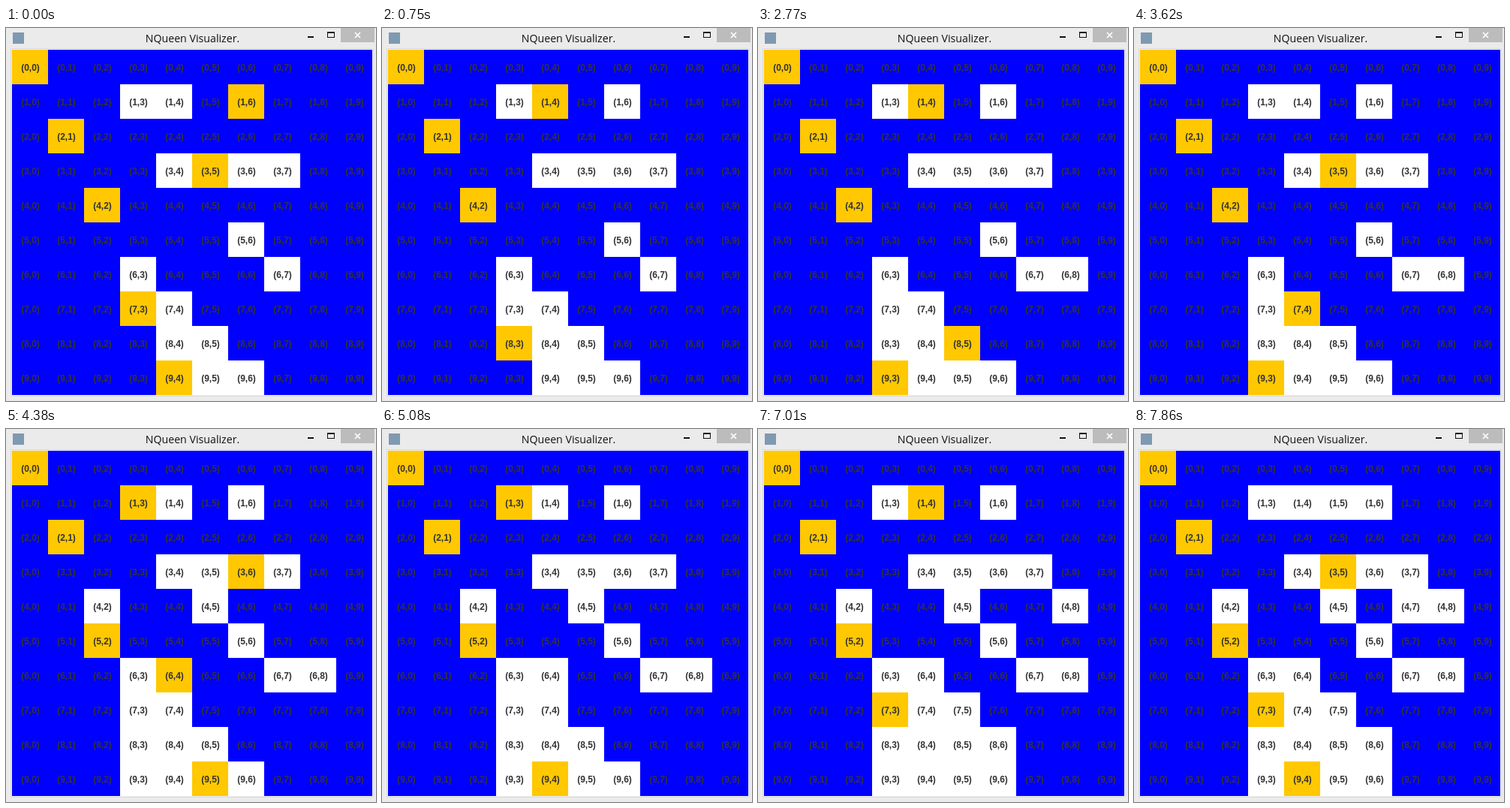
Recreate the animation shown at these times as an HTML page with a canvas. Size 493 by 497 pixels, loop 8 s.

```html
<!DOCTYPE html>
<html lang="en">
<head>
<meta charset="utf-8">
<title>NQueen Visualizer.</title>
<style>
  html, body { margin: 0; width: 100%; height: 100%; overflow: hidden; background: #ebebeb; }
  canvas { display: block; }
</style>
</head>
<body>
<canvas id="stage" width="493" height="497"></canvas>
<script>
const ctx = document.getElementById('stage').getContext('2d');
const N = 10, LEFT = 8, TOP = 29, CELL_W = 48, CELL_H = 46;
const LOOP = 8000, REFRESH = 105;

// Backtracking search, column by column; every placement or removal is one state.
function solve() {
  const queens = [], seen = new Set(), states = [];
  const safe = row => queens.every((r, c) =>
    r !== row && Math.abs(r - row) !== queens.length - c);
  let row = 0;
  while (queens.length < N) {
    while (row < N && !safe(row)) row++;
    if (row < N) {
      seen.add(row + ',' + queens.length);
      queens.push(row);
      row = 0;
    } else {
      row = queens.pop() + 1;
    }
    states.push({ queens: [...queens], seen: new Set(seen) });
  }
  return states;
}

const states = solve();
const first = states.findIndex(s => s.queens.join() === '0,2,4,7,9,3,1');

// Key points of the search; between them the picture refreshes evenly.
const keys = [
  { from: 0, until: 130, step: 0 },
  { from: 1530, until: 1680, step: 19 },
  { from: 2770, until: 2840, step: 35 },
  { from: 4380, until: 4550, step: 58 },
  { from: 5770, until: 5850, step: 75 },
  { from: 7010, until: 7090, step: 92 },
  { from: 7860, until: LOOP, step: 103 },
];

function stepAt(time) {
  const i = keys.findLastIndex(k => k.from <= time);
  const key = keys[i], next = keys[i + 1];
  if (time < key.until) return key.step;
  const span = next.from - key.until;
  const count = Math.round(span / REFRESH);
  const tick = 1 + Math.floor((time - key.until) / span * count);
  return Math.round(key.step + (next.step - key.step) * tick / (count + 1));
}

function box(color, x, y, w, h) {
  ctx.fillStyle = color;
  ctx.fillRect(x, y, w, h);
}

function drawWindow() {
  const w = N * CELL_W, h = N * CELL_H;
  box('#ebebeb', 0, 0, 493, 497);
  box('#dadada', LEFT - 2, TOP - 2, w + 4, h + 4);
  box('#eeeeee', LEFT - 1, TOP - 1, w + 2, h + 2);
  box('#7f99b0', 9, 6, 15, 15);

  ctx.fillStyle = '#111';
  ctx.font = '14.2px "Open Sans", sans-serif';
  ctx.textAlign = 'center';
  ctx.fillText('NQueen Visualizer.', 248.5, 19);

  box('#111', 402, 11, 8, 2);
  box('#111', 428, 5, 10, 8);
  box('#ebebeb', 429, 7, 8, 5);
  box('#bcbcbc', 446, 0, 45, 19);
  ctx.strokeStyle = '#fff';
  ctx.lineWidth = 1.7;
  ctx.beginPath();
  ctx.moveTo(465, 6);
  ctx.lineTo(472, 13);
  ctx.moveTo(472, 6);
  ctx.lineTo(465, 13);
  ctx.stroke();
}

function drawBoard({ queens, seen }) {
  ctx.font = 'bold 12px "Liberation Sans", Arial, sans-serif';
  ctx.textAlign = 'center';
  for (let r = 0; r < N; r++) {
    for (let c = 0; c < N; c++) {
      const x = LEFT + c * CELL_W, y = TOP + r * CELL_H, name = r + ',' + c;
      const color = queens[c] === r ? '#ffc800' : seen.has(name) ? '#fff' : '#00f';
      box(color, x, y, CELL_W, CELL_H);
      ctx.fillStyle = '#333';
      ctx.fillText('(' + name + ')', x + CELL_W / 2 + 0.5, y + 28);
    }
  }
}

let shown = -1;
function frame() {
  const step = stepAt(performance.now() % LOOP);
  if (step !== shown) {
    shown = step;
    drawBoard(states[first + step]);
  }
  requestAnimationFrame(frame);
}

drawWindow();
frame();
</script>
</body>
</html>
```
